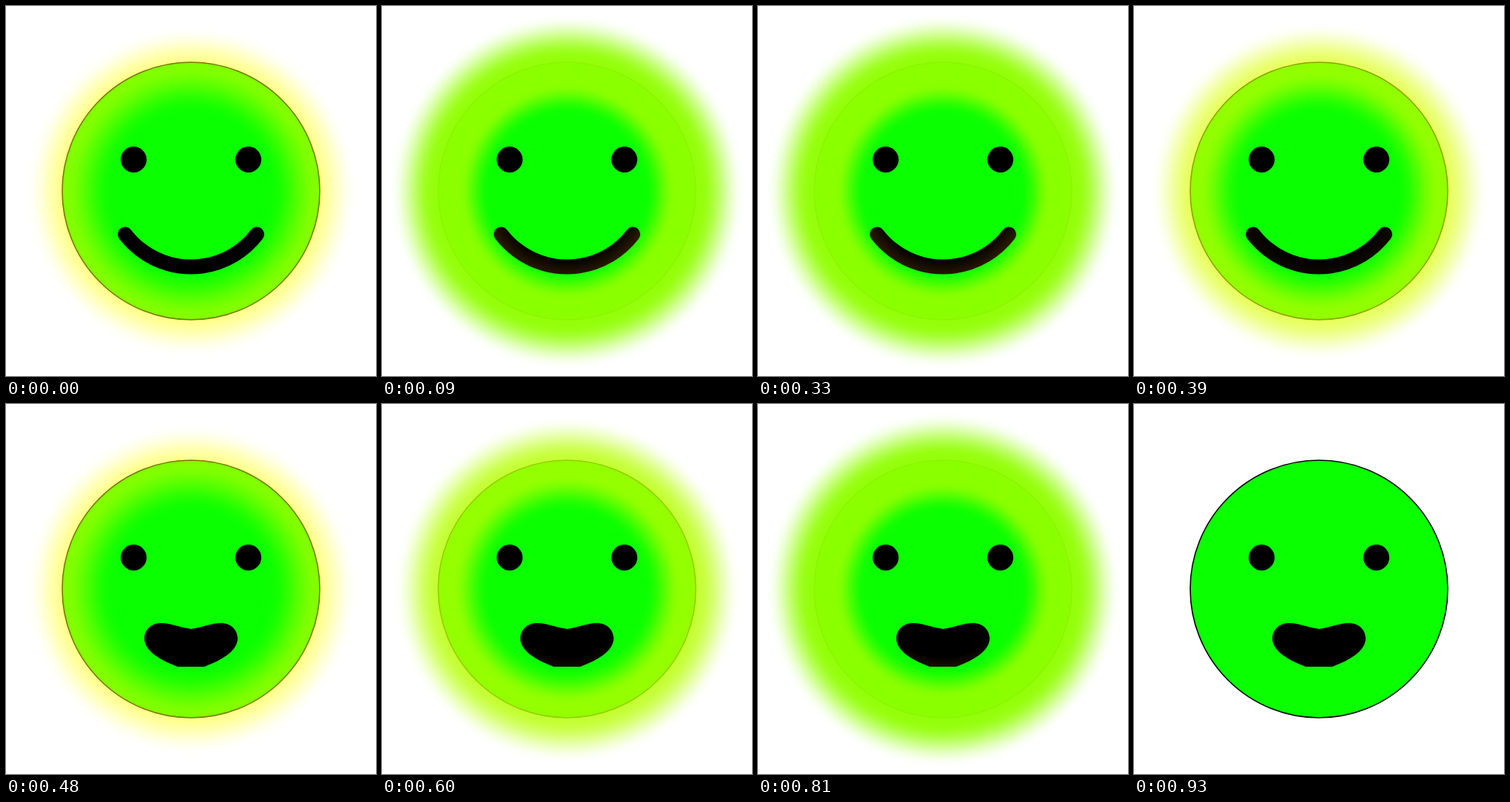
Animation, 500 px wide and 500 px high, one loop 960 ms. Source, as an HTML page with a canvas:

```html
<!DOCTYPE html>
<html>
<head>
<meta charset="utf-8">
<title>Glowing smiley</title>
<style>
html, body { margin: 0; height: 100%; overflow: hidden; background: #fff; }
canvas { display: block; }
</style>
</head>
<body>
<canvas id="stage" width="500" height="500"></canvas>
<script>
const ctx = document.getElementById('stage').getContext('2d');
const STEP = 30, LOOP = 960, CENTER = 250, GLOW_RADIUS = 240;
const OPEN_MOUTH = new Path2D(
  'M250 304C235 302 222 296 210 296C195 296 187 306 187 317' +
  'C187 332 205 345 232 355H268C295 345 313 332 313 317' +
  'C313 306 305 296 290 296C278 296 265 302 250 304Z');

const mix = (a, b, t) => a + (b - a) * t;

function smoothstep(from, to, x) {
  const t = Math.min(1, Math.max(0, (x - from) / (to - from)));
  return t * t * (3 - 2 * t);
}

function circle(x, y, r) {
  ctx.beginPath();
  ctx.arc(x, y, r, 0, Math.PI * 2);
}

// A soft ring that rises inside the face and fades out beyond its rim
function glowAlpha(r, strength) {
  const rise = smoothstep(105, mix(172, 146, strength), r);
  const fade = smoothstep(mix(165, 180, strength), mix(224, GLOW_RADIUS, strength), r);
  return mix(.5, .96, strength) * rise * (1 - fade);
}

function drawGlow(strength) {
  const red = mix(255, 144, strength);
  const gradient = ctx.createRadialGradient(CENTER, 251, 0, CENTER, 251, GLOW_RADIUS);
  for (let r = 100; r <= GLOW_RADIUS; r += 5) {
    gradient.addColorStop(r / GLOW_RADIUS, `rgba(${red},255,0,${glowAlpha(r, strength)})`);
  }
  ctx.fillStyle = gradient;
  ctx.fillRect(0, 0, 500, 500);
}

function drawMouth(open, strength) {
  // The glow warms the outer edge of the mouth
  const color = ctx.createRadialGradient(CENTER, CENTER, 92, CENTER, CENTER, 116);
  color.addColorStop(0, '#000');
  color.addColorStop(1, `rgb(${44 * strength},${27 * strength},0)`);
  ctx.fillStyle = ctx.strokeStyle = color;
  if (open) return ctx.fill(OPEN_MOUTH);
  const angle = Math.atan2(68, 89);
  ctx.beginPath();
  ctx.arc(CENTER, 240.5, 112, angle, Math.PI - angle);
  ctx.lineWidth = 20;
  ctx.lineCap = 'round';
  ctx.stroke();
}

function draw(time) {
  const step = Math.floor(time % LOOP / STEP);
  // Triangle wave: 1 2 3 4 3 2 1 0
  const level = 4 - Math.abs(step % 8 - 3);
  const strength = Math.max(0, (level - 1) / 3);

  ctx.fillStyle = '#fff';
  ctx.fillRect(0, 0, 500, 500);
  circle(CENTER, CENTER, 174);
  ctx.fillStyle = '#0aff00';
  ctx.fill();
  ctx.strokeStyle = '#000';
  ctx.lineWidth = 1.6;
  ctx.stroke();

  if (level) drawGlow(strength);

  ctx.fillStyle = '#000';
  for (const x of [172.5, 327.5]) {
    circle(x, 207.5, 17.5);
    ctx.fill();
  }
  drawMouth(step >= 16, strength);
}

const start = performance.now();
function tick() {
  draw(performance.now() - start);
  requestAnimationFrame(tick);
}
tick();
</script>
</body>
</html>
```
